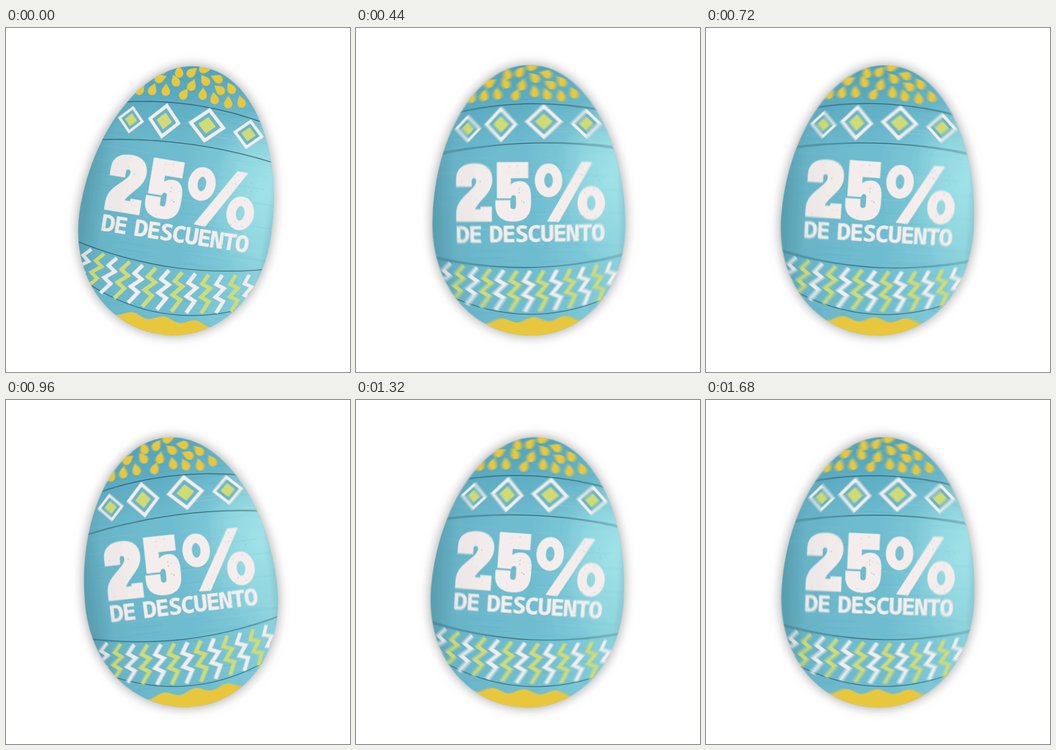
Animation of 650 by 650 pixels, one loop 1720 ms. Source, as an HTML page with a canvas:

```html
<!DOCTYPE html>
<html lang="es">
<head>
<meta charset="utf-8">
<title>25% de descuento</title>
<style>
html, body { margin: 0; width: 100%; height: 100%; overflow: hidden; background: #fff; }
canvas { display: block; }
</style>
</head>
<body>
<canvas id="stage" width="650" height="650"></canvas>
<script>
const SIZE = 650, PIVOT = { x: 326, y: 329 };
const LOOP = 1720, STEP = 40, PERIOD = 604, SWING = 8.45, REST = 0.95;
const SHUTTER = 24, SAMPLES = 9;
const WHITE = '#f1ebe9', LIME = '#d0da72', YELLOW = '#e7c63a', TEAL = '#66b4c8';

let seed = 7;
const random = () => (seed = seed * 16807 % 2147483647) / 2147483647;
const between = (a, b) => a + random() * (b - a);

const eggShape = new Path2D(
  'M328 70C434 70 508.5 215 508.5 372C508.5 493 431 581 330 581' +
  'C225 581 144.5 493 144.5 372C144.5 215 224 70 328 70Z');

function gradient(g, stops) {
  stops.forEach(([at, color]) => g.addColorStop(at, color));
  return g;
}

function drawBody(c) {
  c.save();
  c.shadowColor = 'rgba(0,0,0,.4)';
  c.shadowBlur = 24;
  c.fillStyle = TEAL;
  c.fill(eggShape);
  c.restore();
  c.clip(eggShape);
  c.fillStyle = gradient(c.createLinearGradient(145, 340, 508, 300), [
    [0, '#63adbf'], [.12, '#69b5c9'], [.5, '#6dbbce'], [.78, '#7dc8d6'], [1, '#90d3dc']]);
  c.fillRect(0, 0, SIZE, SIZE);
  c.fillStyle = gradient(c.createLinearGradient(0, 70, 0, 230), [
    [0, 'rgba(50,135,165,.55)'], [1, 'rgba(50,135,165,0)']]);
  c.fillRect(0, 0, SIZE, 230);
  c.save();
  c.translate(480, 285);
  c.scale(.72, 1.15);
  c.fillStyle = gradient(c.createRadialGradient(0, 0, 0, 0, 0, 140), [
    [0, 'rgba(168,232,236,.65)'], [.5, 'rgba(163,230,234,.4)'], [1, 'rgba(163,230,234,0)']]);
  c.fillRect(-150, -150, 300, 300);
  c.restore();
  // faint brush strokes
  for (let i = 0; i < 170; i++) {
    c.fillStyle = random() < .5 ? 'rgba(255,255,255,.045)' : 'rgba(20,100,135,.05)';
    c.fillRect(between(130, 480), between(70, 580), between(20, 110), between(.6, 2.5));
  }
}

function drawDrop(c, x, y, degrees) {
  c.save();
  c.translate(x, y);
  c.rotate(degrees * Math.PI / 180);
  c.fill(new Path2D('M0 -13C3 -7 8 -3 8 3A8 8 0 0 1 -8 3C-8 -3 -3 -7 0 -13Z'));
  c.restore();
}

function drawDiamond(c, x, y, w, h) {
  [[1, WHITE], [.73, TEAL], [.47, LIME]].forEach(([k, color]) => {
    c.fillStyle = color;
    c.beginPath();
    c.moveTo(x - w * k, y);
    c.lineTo(x, y - h * k);
    c.lineTo(x + w * k, y);
    c.lineTo(x, y + h * k);
    c.fill();
  });
}

// each zigzag hangs square to the curved band
function drawZigzags(c) {
  const zigzag = new Path2D('M0 0L-12 19L4 27L-13 45L3 53L-11 77');
  c.lineWidth = 7.5;
  for (let i = 0; i < 14; i++) {
    const x = 178 + 25.2 * i, side = (x - 327) / 170;
    c.save();
    c.translate(x, 459 - 20 * side * side);
    c.rotate(-side * .235);
    const k = 1 - .18 * side * side;
    c.scale(k, k);
    c.strokeStyle = i % 2 ? LIME : WHITE;
    c.stroke(zigzag);
    c.restore();
  }
}

function drawWave(c) {
  c.fillStyle = YELLOW;
  c.beginPath();
  c.moveTo(200, 600);
  for (let x = 200; x <= 460; x += 4)
    c.lineTo(x, 551 - (x - 330) * .035 - 4.5 * Math.cos((x - 274) / 60 * 2 * Math.PI));
  c.lineTo(460, 600);
  c.fill();
}

function drawLettering(c) {
  c.fillStyle = c.strokeStyle = WHITE;
  c.lineJoin = 'round';
  const two = 'M190 299V284C190 264 206 256 225 256C246 256 257 268 257 287' +
    'C257 313 229 326 224 343H236V338H256V365H190V350C190 318 227 308 228 289' +
    'C228 281 219 281 218 287V299Z';
  const five = 'M267 254H325V283H292V297C298 291 304 290 310 290C324 290 330 302 330 318' +
    'V331C330 355 317 365 297 365C276 365 264 355 264 335V326H291V336' +
    'C291 345 303 345 303 336V322C303 313 294 313 292 321H267Z';
  const slash = 'M362 365L427 254H446L383 366Z';
  c.lineWidth = 1.5;
  [two, five, slash].map(d => new Path2D(d)).forEach(p => { c.fill(p); c.stroke(p); });
  c.lineWidth = 18;
  [[364, 288], [444.5, 331]].forEach(([x, y]) => {
    c.beginPath();
    c.ellipse(x, y, 17, 23, 0, 0, 7);
    c.stroke();
  });

  c.save();
  c.translate(190, 405.5);
  c.rotate(-.012);
  c.font = '900 43px "Noto Sans Mono", "DejaVu Sans Mono", monospace';
  c.letterSpacing = '-1.7px';
  c.lineWidth = .8;
  [['DE', -1], ['DESCUENTO', 62]].forEach(([word, x]) => {
    c.fillText(word, x, 0);
    c.strokeText(word, x, 0);
  });
  c.restore();

  // worn print
  c.fillStyle = TEAL;
  for (let i = 0; i < 150; i++) {
    c.globalAlpha = between(.25, .8);
    c.beginPath();
    c.arc(between(190, 470), between(256, 405), between(.4, 1.2), 0, 7);
    c.fill();
  }
  c.globalAlpha = 1;
}

function paintEgg() {
  const art = document.createElement('canvas');
  art.width = art.height = SIZE;
  const c = art.getContext('2d');
  c.fillStyle = '#fff';
  c.fillRect(0, 0, SIZE, SIZE);
  drawBody(c);

  c.fillStyle = YELLOW;
  [[257, 87, 75], [287, 86, -10], [311, 83, 40], [334, 73, 80], [360, 87, -75],
   [338, 94, -45], [389, 101, -40], [254, 104, 60], [283, 104, -30], [315, 107, 15],
   [368, 107, -60], [243, 127, 10], [268, 124, -8], [303, 126, 25], [338, 120, -5],
   [361, 125, -20], [388, 128, -8], [412, 123, -25], [220, 131, 30]]
    .forEach(d => drawDrop(c, ...d));

  c.strokeStyle = '#1f4a55';
  c.lineWidth = 1.2;
  c.stroke(new Path2D('M195 159Q326 129 466 156M158 237Q330 203 496 227' +
    'M143 432Q327 475 508 428M188 511Q330 571 472 511'));

  [[212, 190, 25, 26.5], [274.5, 182, 31.5, 34], [355.5, 177, 36, 33.5], [435.5, 181, 29.5, 28.5]]
    .forEach(d => drawDiamond(c, ...d));
  drawZigzags(c);
  drawWave(c);
  drawLettering(c);

  c.fillStyle = gradient(c.createLinearGradient(145, 0, 508, 0), [
    [0, 'rgba(15,60,80,.16)'], [.12, 'rgba(15,60,80,.03)'], [.3, 'rgba(15,60,80,0)'],
    [.96, 'rgba(15,60,80,0)'], [1, 'rgba(15,60,80,.1)']]);
  c.fillRect(0, 0, SIZE, SIZE);
  return art;
}

const egg = paintEgg();
const ctx = document.getElementById('stage').getContext('2d');
const tilt = ms => (REST + SWING * Math.cos(2 * Math.PI * ms / PERIOD)) * Math.PI / 180;

function render(ms) {
  ctx.fillStyle = '#fff';
  ctx.fillRect(0, 0, SIZE, SIZE);
  // motion blur: running average of poses while the shutter is open
  for (let i = 0; i < SAMPLES; i++) {
    ctx.save();
    ctx.globalAlpha = 1 / (i + 1);
    ctx.translate(PIVOT.x, PIVOT.y);
    ctx.rotate(tilt(ms + SHUTTER * (i / (SAMPLES - 1) - .5)));
    ctx.drawImage(egg, -PIVOT.x, -PIVOT.y);
    ctx.restore();
  }
}

function tick() {
  render(Math.floor(performance.now() % LOOP / STEP) * STEP);
  requestAnimationFrame(tick);
}
tick();
</script>
</body>
</html>
```
